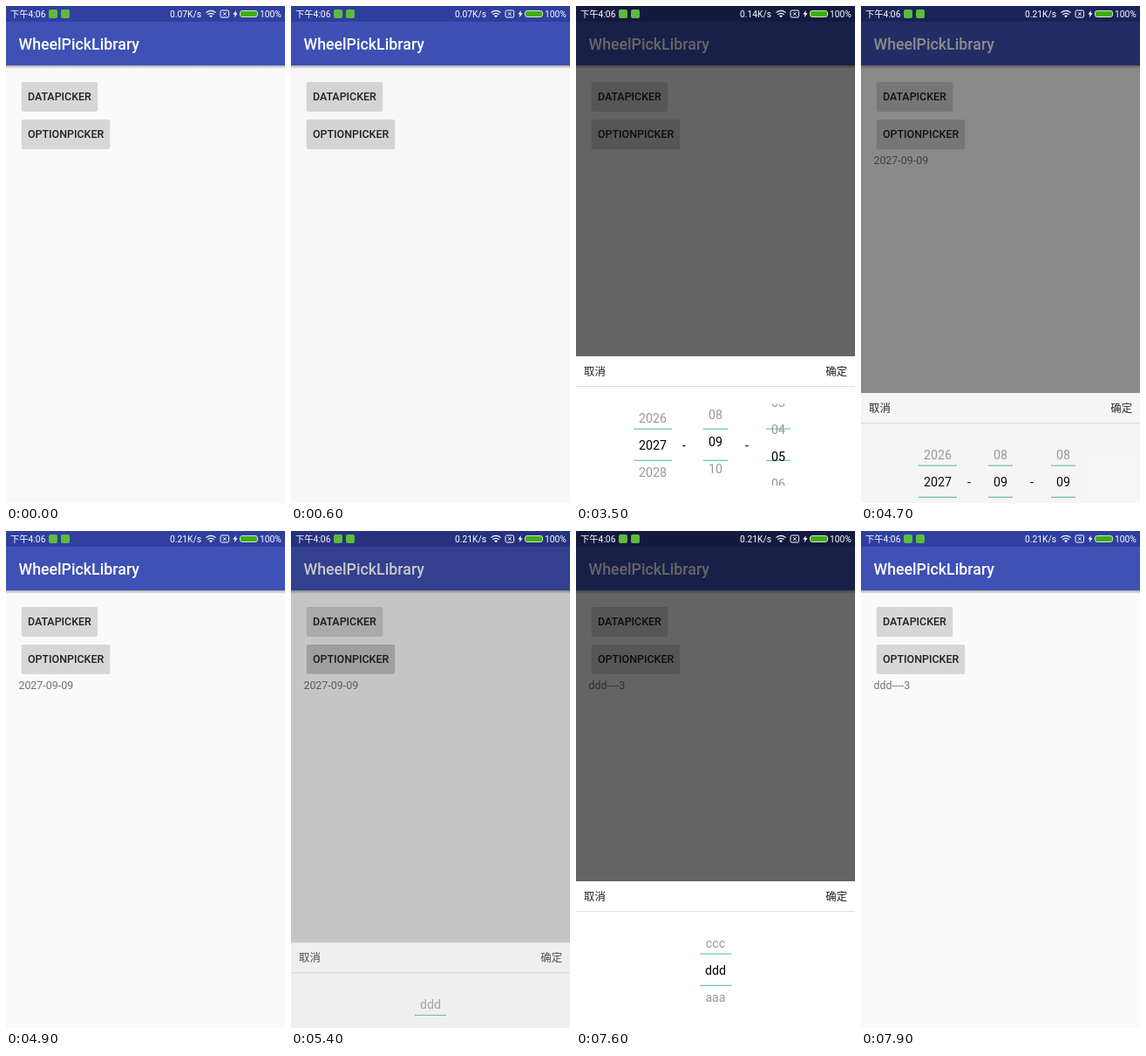
Recreate the animation shown at these times as an HTML page. Size 320 px wide and 569 px high, loop 8000 ms.

```html
<!DOCTYPE html>
<html lang="zh">
<head>
<meta charset="utf-8">
<title>WheelPickLibrary</title>
<style>
  html, body { margin: 0; width: 100%; height: 100%; overflow: hidden; background: #fafafa; }
  svg { display: block; width: 100vw; height: 100vh; font-family: Roboto, "Noto Sans CJK SC", "Noto Sans CJK", sans-serif; }
  .status { font-size: 10.3px; fill: #fff; }
  .button { font-size: 12.44px; font-weight: 500; fill: #212121; }
  .action { font-size: 12.44px; fill: #222; }
  .wheel { font-size: 14.22px; text-anchor: middle; }
  .rule { fill: #45b5a8; }
</style>
</head>
<body>
<svg viewBox="0 0 320 569">
  <defs>
    <linearGradient id="shade" x2="0" y2="1">
      <stop offset="0" stop-opacity=".3"/>
      <stop offset="1" stop-opacity="0"/>
    </linearGradient>
    <clipPath id="window"><rect y="54.5" width="320" height="93.5"/></clipPath>
  </defs>

  <rect width="320" height="569" fill="#fafafa"/>
  <rect y="68" width="320" height="4" fill="url(#shade)"/>
  <rect width="320" height="68" fill="#3f51b5"/>
  <rect width="320" height="18" fill="#303f9f"/>
  <text x="14.5" y="50" font-size="17.78" font-weight="500" fill="#fff">WheelPickLibrary</text>
  <g id="buttons"></g>
  <text id="result" x="14.4" y="181" font-size="12.44" fill="#000" fill-opacity=".54"></text>

  <rect id="scrim" width="320" height="569"/>

  <g class="status">
    <text x="5" y="13">下午4:06</text>
    <rect x="49" y="4" width="10" height="10" rx="2" fill="#5dbb3c"/>
    <rect x="63" y="4" width="10" height="10" rx="2" fill="#5dbb3c"/>
    <text id="speed" x="224" y="13" text-anchor="end"></text>
    <g fill="none" stroke="#fff" stroke-width="1.2">
      <path d="M229.4 7.6Q235 3.2 240.6 7.6M231.3 9.8Q235 7 238.7 9.8"/>
      <path d="M233 11.3Q235 9.8 237 11.3L235 13.3Z" fill="#fff" stroke="none"/>
      <rect x="246" y="5" width="9.6" height="8" rx="1.5" stroke-width="1"/>
      <path d="M249 7.2l3.6 3.6m0-3.6l-3.6 3.6" stroke-width="1"/>
      <rect x="268.5" y="5.5" width="20" height="7" rx="2.4" fill="#3fae10" stroke="#d5e8cf" stroke-width="1"/>
    </g>
    <path d="M264 5l-3.6 4.6h2.2l-.8 3.6 3.8-4.9h-2.3z"/>
    <text x="291" y="13">100%</text>
  </g>

  <g id="panel">
    <rect width="320" height="168" fill="#fff"/>
    <rect y="34" width="320" height="1" fill="#dedede"/>
    <text class="action" x="9" y="22">取消</text>
    <text class="action" x="286.3" y="22">确定</text>
    <g id="datePicker"></g>
    <g id="optionPicker"></g>
  </g>
</svg>
<script>
const LOOP = 8000, STEP = 100, ROW = 31, CENTER = 102;
const PANEL_TOP = 401, PANEL_HEIGHT = 168, SLIDE = 300;
const $ = id => document.getElementById(id);
const clamp = v => Math.max(0, Math.min(1, v));
const part = (t, start, length) => clamp((t - start) / length);
const easeOut = (u, power) => 1 - (1 - u) ** power;
const easeBoth = u => (1 - Math.cos(Math.PI * u)) / 2;
const mod = (n, m) => ((n % m) + m) % m;
const pad = n => String(n).padStart(2, "0");

function add(parent, tag, attrs, text = "") {
  const node = document.createElementNS("http://www.w3.org/2000/svg", tag);
  for (const key in attrs) node.setAttribute(key, attrs[key]);
  node.textContent = text;
  parent.append(node);
  return node;
}

function makeButton(y, width, label) {
  const box = { x: 18, y, width, height: 33, rx: 2 };
  add($("buttons"), "rect", { ...box, y: y + 1, fill: "#000", opacity: .14 });
  add($("buttons"), "rect", { ...box, x: 17.5, width: width + 1, fill: "#000", opacity: .07 });
  add($("buttons"), "rect", { ...box, fill: "#d6d7d7" });
  const ripple = add($("buttons"), "rect", { ...box, fill: "#000", opacity: 0 });
  add($("buttons"), "text", { class: "button", x: 25, y: y + 21 }, label);
  return ripple;
}

// A wheel shows the five rows nearest to a fractional position.
function makeWheel(parent, x, width, label) {
  for (const y of [82.6, 118.8])
    add(parent, "rect", { class: "rule", x: x - width / 2, y, width, height: 1 });
  const view = add(parent, "g", { class: "wheel", "clip-path": "url(#window)" });
  const rows = Array.from({ length: 5 }, () => add(view, "text", { x }));
  return pos => {
    const nearest = Math.round(pos);
    rows.forEach((row, i) => {
      const n = nearest + i - 2;
      row.textContent = label(n);
      row.setAttribute("y", CENTER + 5 + (n - pos) * ROW);
      row.setAttribute("fill", n === nearest ? "#000" : "#999");
    });
  };
}

const fling = (t, from, to, start, end, power) =>
  from + (to - from) * easeOut(part(t, start, end - start), power);

const dates = $("datePicker"), options = $("optionPicker");
const rippleDate = makeButton(87, 87, "DATAPICKER");
const rippleOption = makeButton(130, 101, "OPTIONPICKER");
const year = makeWheel(dates, 88, 44, String);
const month = makeWheel(dates, 160, 28, n => pad(mod(n - 1, 12) + 1));
const day = makeWheel(dates, 232, 28, n => pad(mod(n - 1, 30) + 1));
const option = makeWheel(options, 160, 36, n => "abcd"[mod(n, 4)].repeat(3));
for (const x of [124, 196])
  add(dates, "text", { class: "wheel", x, y: CENTER + 5 }, "-");

const sessions = [
  { open: 594, close: 4600, picker: dates },
  { open: 5294, close: 7600, picker: options }
];

function panelState(t, { open, close }) {
  const enter = part(t, open, SLIDE), leave = part(t, close, SLIDE);
  if (leave > 0) {
    const shown = 1 - easeBoth(leave);
    return { shown, dim: shown, alpha: 1 - leave ** 2.3 };
  }
  return { shown: easeOut(enter, 2), dim: enter, alpha: easeOut(enter, 3) };
}

function press(ripple, t, start) {
  const u = part(t, start, 500);
  ripple.setAttribute("opacity", .1 * Math.sin(Math.PI * u));
}

function draw(t) {
  const session = sessions[t < 5000 ? 0 : 1];
  const { shown, dim, alpha } = panelState(t, session);
  $("scrim").setAttribute("opacity", .6 * dim);
  $("panel").setAttribute("opacity", alpha);
  $("panel").setAttribute("transform", `translate(0 ${PANEL_TOP + PANEL_HEIGHT * (1 - shown)})`);
  for (const s of sessions) s.picker.style.display = s === session ? "" : "none";

  press(rippleDate, t, 100);
  press(rippleOption, t, 5000);
  $("speed").textContent = (t < 1000 ? "0.07" : t < 4000 ? "0.14" : "0.21") + "K/s";
  $("result").textContent = t < 4600 ? "" : t < 7600 ? "2027-09-09" : "ddd----3";

  year(fling(t, 2016, 2027, 1200, 2700, 2.24));
  const settle = .175 * easeBoth(part(t, 3400, 300));
  month(fling(t, 10, 21.175, 2100, 3400, 2.4) - settle);
  day(fling(t, 24, 39, 2900, 4400, 2.39));
  option(fling(t, 0, 7, 5900, 7500, 2.3));
}

const began = performance.now();
function tick() {
  const t = (performance.now() - began) % LOOP;
  draw(Math.floor(t / STEP) * STEP);
  requestAnimationFrame(tick);
}
tick();
</script>
</body>
</html>
```
